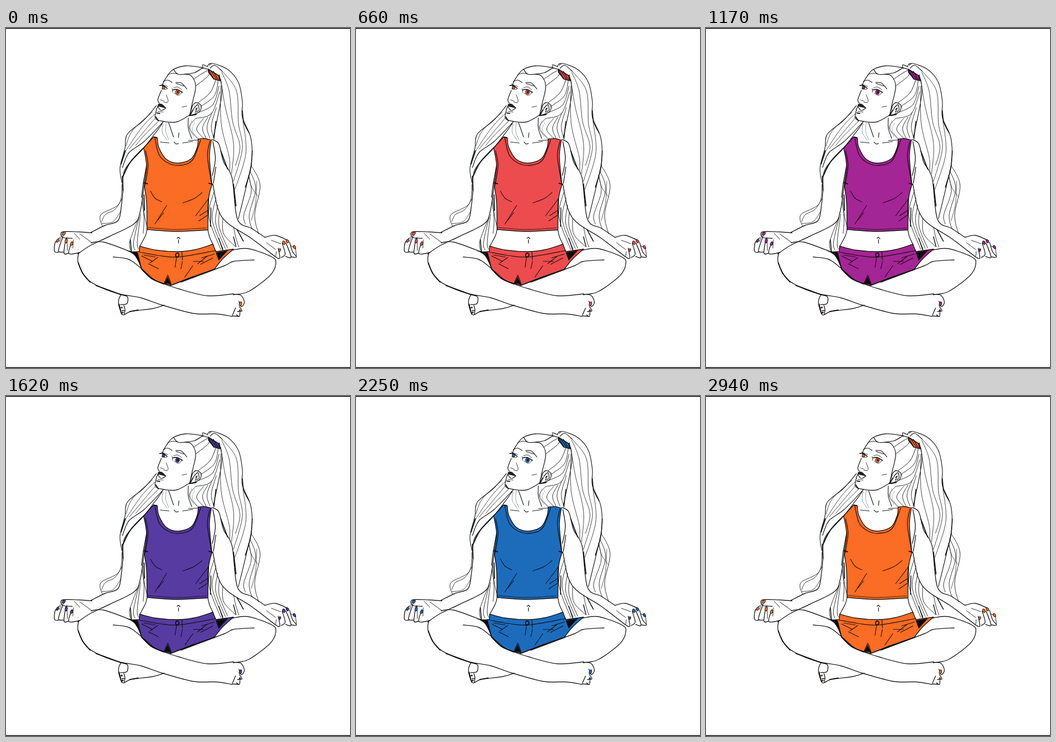
Animation of 700 by 692 pixels, one loop 3090 ms. Source, as an HTML page:

```html
<!DOCTYPE html>
<html lang="en">
<head>
<meta charset="utf-8">
<title>Sitting figure</title>
<style>
html, body { margin: 0; width: 100%; height: 100%; overflow: hidden; background: #fff; }
svg { display: block; width: 100vw; height: 100vh; animation: dye 3090ms infinite; }
path { stroke-linecap: round; stroke-linejoin: round; }
svg { --orange: rgb(251,108,36); --pink: rgb(214,25,144); --violet: rgb(105,50,155); --royal: rgb(30,88,180); --sky: rgb(28,131,197); }
/* Time in ms / 3090; each fade advances in 30 ms steps */
@keyframes dye {
  0% { color: var(--orange); animation-timing-function: step-end; }
  15.534% { color: var(--orange); animation-timing-function: steps(18, start); }
  33.01% { color: var(--pink); animation-timing-function: steps(13, start); }
  45.631% { color: var(--violet); animation-timing-function: step-end; }
  49.515% { color: var(--violet); animation-timing-function: steps(17, start); }
  66.019% { color: var(--royal); animation-timing-function: step-end; }
  66.99% { color: var(--royal); animation-timing-function: steps(15, start); }
  81.553% { color: var(--sky); animation-timing-function: step-end; }
  91.262% { color: var(--sky); animation-timing-function: steps(5, start); }
  96.117%, 100% { color: var(--orange); animation-timing-function: step-end; }
}
</style>
</head>
<body>
<svg id="stage" viewBox="0 0 700 692" preserveAspectRatio="none">
  <rect width="700" height="692" fill="#fff"/>
  <path d="M0 .7H700M0 691H700" stroke="#000" stroke-width="1.5"/>
</svg>
<script>
const stage = document.getElementById('stage');
const points = text => text.trim().split(/\s+/).map(s => s.split(',').map(Number));

// Smooth curve through a list of points
function curve(p, start = 'M') {
  const at = i => p[Math.max(0, Math.min(p.length - 1, i))];
  let d = start + p[0];
  for (let i = 0; i < p.length - 1; i++) {
    const [a, b, c, e] = [at(i - 1), at(i), at(i + 1), at(i + 2)];
    const c1 = b.map((v, k) => v + (c[k] - a[k]) / 6);
    const c2 = c.map((v, k) => v - (e[k] - b[k]) / 6);
    d += `C${c1} ${c2} ${c}`;
  }
  return d;
}

function add(d, width, fill = 'none', stroke = '#0b0b0b', transform = '') {
  const el = document.createElementNS('http://www.w3.org/2000/svg', 'path');
  const attrs = { d, fill, stroke, transform, 'stroke-width': width };
  for (const k in attrs) el.setAttribute(k, attrs[k]);
  stage.append(el);
}

// ";" separates strokes, "|" marks a corner of a shape
const ink = (width, text, stroke) =>
  add(text.split(';').map(s => curve(points(s))).join(''), width, 'none', stroke);
const shape = (text, fill = 'currentColor', width = 1.4) =>
  add(text.split('|').map((s, i) => curve(points(s), i ? 'L' : 'M')).join('') + 'Z', width, fill);
const dot = (x, y, rx, ry, turn = 0, width = 1, fill = 'currentColor') =>
  add(`M${-rx} 0A${rx} ${ry} 0 0 1 ${rx} 0A${rx} ${ry} 0 0 1 ${-rx} 0Z`, width, fill, '#0b0b0b',
    `translate(${x} ${y}) rotate(${turn})`);

// n hairs blended between two guide curves
function hairs(n, from, to, width = .9, stroke = '#1c1c1c') {
  const a = points(from), b = points(to);
  for (let i = 0; i < n; i++) {
    const t = n > 1 ? i / (n - 1) : 0;
    add(curve(a.map((p, j) => p.map((v, k) => v + (b[j][k] - v) * t))), width, 'none', stroke);
  }
}

// Top
shape(`300,222 308,224 | 308,224 311,243 326,267 350,275 377,266 389,243 391,226 | 391,226 404,225 418,228 |
  418,228 414,262 419,319 | 419,319 412,350 411,411 | 411,411 345,414 287,410 | 287,410 286,355 281,318 |
  281,318 286,280 280,244 | 280,244 300,222`);
ink(1.3, '303,225 312,259 332,276 357,279 380,268 396,228; 284,250 289,280 283,320; 415,230 410,262 419,319');
ink(.9, '289,406 345,410 408,407');
ink(1.1, `294,332 303,346 317,354; 399,335 383,347 360,356; 327,361 303,399; 321,376 309,391;
  411,349 386,382; 411,371 394,382; 410,381 392,393`);
ink(2, '281,315 288,317; 412,347 411,378; 413,316 420,318; 301,222 307,223');

// Shorts
shape(`272,444 305,452 350,455 385,451 421,440 | 421,440 427,455 | 427,455 463,450 | 463,450 440,471 424,491 |
  424,491 375,508 335,524 | 335,524 300,512 276,491 | 276,491 266,466 254,456 | 254,456 271,455 | 271,455 272,444`);
ink(1.2, `271,456 310,463 352,466 427,453; 358,456 359,472; 347,467 344,487; 359,475 356,490;
  276,464 298,475; 280,462 304,466; 309,467 293,478; 290,480 310,490`);
ink(1.2, `424,460 398,468; 421,468 396,481; 410,464 390,480; 381,475 402,475; 380,484 364,507;
  329,503 322,519; 330,504 336,521`);
shape('329,507 322,521 | 322,521 329,520 336,523 | 336,523 329,507', '#0b0b0b', .6);
shape('246,453 268,457 | 268,457 276,489 | 276,489 262,463 246,453', '#0b0b0b', .5);
shape('427,457 451,453 | 451,453 433,473 | 433,473 427,457', '#0b0b0b', .4);
dot(348.5, 462, 3.4, 4, 10, 2);

// Waist
ink(1.3, '287,410 284,422 272,445; 411,412 414,425 422,442; 348,428 351,426 354,429; 351,431 351,438');

// Ponytail and bun
ink(1.2, `414,76 421,72 452,85 473,111 481,150 481,182 498,223 500,270 489,322 473,388;
  401,83 400,75 411,79; 410,78 413,73 418,73; 415,82 425,76 440,88; 434,95 439,135 422,223`);
hairs(2, '440,88 469,128 473,194 481,245 463,312', '439,90 454,128 461,190 476,240 467,280');
hairs(2, '437,104 446,160 463,235 459,296', '437,118 438,195 454,262 455,290');
hairs(1, '482,188 488,255 466,328', '482,188 488,255 466,328');
hairs(3, '499,280 517,320 506,380 514,419', '493,300 499,334 484,380 487,399', 1);
hairs(2, '514,344 500,324 495,302', '510,312 508,356 499,392', .8);
ink(1.6, '481,168 484,192 495,214; 501,250 498,286 487,324; 427,190 423,226');

// Hair on the head
ink(1.3, `329,96 341,84 366,77 396,80 410,84; 341,84 350,94 375,96 386,118 379,153 374,177;
  363,94 383,91 399,82`);
ink(1, `331,94 341,92 350,94; 382,104 400,92 411,86; 386,118 408,101 414,93; 391,152 415,132 427,106`);
hairs(3, '396,160 424,138 432,106', '387,184 418,174 435,130', 1);
hairs(2, '386,184 373,203 391,226', '402,184 388,206 404,226', 1);
hairs(3, '411,181 400,204 408,226', '428,162 418,198 422,222', 1);
hairs(2, '378,188 375,208 383,221', '384,193 379,208 389,223', .9, '#8aa5b2');
shape('412,84 433,97 | 433,97 434,107 | 434,107 423,104 | 423,104 412,90 | 412,90 412,84', 'currentColor', 1.7);
ink(1.3, '416,86 428,104; 422,88 431,104; 411,83 423,104; 433,97 436,108');

// Face
ink(1.3, `330,95 321,109 318,119; 316,127 309,146 312,153; 309,159 306,167 304,184 320,190 348,191 377,175`);
ink(1.2, '320,109 329,106 338,111; 345,111 357,112 368,124; 346,113 362,118');
ink(.9, '338,123 339,131; 326,136 330,148 327,152; 314,146 322,149; 321,151 328,152; 358,161 368,159; 320,171 309,170');
ink(1.8, '313,117 320,117 328,123; 340,126 348,125 359,131; 307,173 313,174; 305,181 310,189');
ink(.9, '317,124 327,125; 342,132 350,137 358,132; 341,122 349,120 358,126; 316,114 329,119');
dot(320.5, 121.5, 2.6, 3, 20);
dot(349, 130.5, 4, 4.3, 10);
dot(349.5, 130.5, 1.4, 1.7, 0, .8, '#0b0b0b');
shape('310,155 317,155 326,163 | 326,163 309,159 | 309,159 310,155', '#2a1d1f', .8);
ink(1.2, '309,160 316,168 325,163');

// Ear and neck
ink(1.3, `378,160 386,152 397,158 393,171 376,178; 382,164 390,156 393,166 388,171;
  385,166 389,163 385,172; 379,160 373,179`);
ink(2, '376,178 387,176; 381,166 374,178');
ink(1.2, `371,183 371,204 378,225; 331,193 341,222; 352,213 351,223; 342,232 346,236 351,235;
  314,232 332,234; 359,234 380,231; 371,229 391,228`);
hairs(2, '320,195 318,212 328,228', '326,193 325,210 331,227', .9, '#6f8b98');

// Hair falling on the left
ink(1.2, `306,158 280,188 247,216 242,245 232,285 236,315; 320,191 281,231 250,254 237,284;
  318,195 282,242 242,288 238,332`);
hairs(2, '304,174 276,203 241,254', '304,183 277,215 251,246');
hairs(2, '298,171 258,208 244,240', '310,190 281,219 264,239');
ink(2.3, '280,244 253,273 238,302; 243,250 234,277; 237,302 238,330', '#10181c');
hairs(2, '236,318 230,358 193,380 196,403', '237,346 222,369 202,380 195,394', 1);
hairs(1, '234,372 218,394 195,398', '234,372 218,394 195,398');

// Left arm and the strands behind it
ink(1.4, `238,330 235,360 228,392 201,402 173,416; 281,320 273,374 260,399 211,424 171,443 146,460;
  286,280 279,318 276,345`);
hairs(2, '279,346 281,377 288,409', '277,353 281,388 279,418', 1);
hairs(3, '268,391 252,434 253,452', '274,379 267,438 272,452', 1);
ink(1.8, '281,340 282,371; 253,431 255,454');

// Left hand
ink(1.4, `175,417 148,415 115,415 115,426 135,428; 109,427 100,437 99,455 108,456;
  116,424 107,453 118,456; 122,428 118,458 128,458; 134,435 128,459 150,457`);
ink(1, '113,422 109,435; 124,426 125,453; 150,419 175,437; 137,431 136,448; 139,418 150,430');
dot(117.5, 418.5, 2.6, 4, 40);
dot(105, 433, 2.2, 3.6, 30);
dot(122.5, 433.5, 2.4, 4.2, 12);
dot(133.5, 439, 2.4, 3.8, 25);

// Right arm and the strands behind it
ink(1.4, `419,227 433,236 443,273 460,305 471,389 500,408 527,426;
  421,318 432,370 452,398 499,428 546,464; 421,231 426,266 420,300; 427,283 422,316`);
ink(1.9, '463,318 468,362; 437,250 451,287');
hairs(4, '424,331 413,384 437,451', '434,376 434,406 451,448', 1);
hairs(2, '441,387 443,419 466,444', '463,405 468,428 474,446', 1);
ink(1.6, '470,410 483,434; 417,366 416,404; 433,428 441,452; 463,425 468,445');

// Right hand
ink(1.4, `527,426 548,422 575,433; 546,464 557,469 554,448; 577,436 583,455 591,466 581,466;
  570,438 580,466 569,465; 562,438 568,460 560,467`);
ink(1, '589,448 591,464; 540,432 559,439; 530,437 549,451; 550,455 549,464; 579,443 590,449');
dot(565.5, 437, 2.6, 3.8, -20);
dot(572.5, 434, 2.4, 3.6, -25);
dot(587, 446, 2.2, 3.6, -25);
dot(557, 452, 2, 3, 20);

// Legs
ink(1.4, `148,457 147,478 165,511 198,530 234,542 274,549 318,564 382,581 428,582 460,587;
  173,437 200,436 258,457; 218,466 250,471 276,490 305,514 352,531 410,545 463,541`);
ink(1.4, `461,452 493,449 541,466 549,480 537,504 494,536 463,543; 335,524 378,508 444,484 463,475 505,472`);
ink(2.1, '147,478 156,499 171,517; 183,524 232,542; 276,491 296,510 321,521; 425,491 356,517');

// Feet
ink(1.4, `462,542 478,544 485,558 479,567 474,556; 475,567 480,576 471,577; 476,579 475,587 469,584;
  475,587 460,586; 467,570 461,584`);
ink(1.4, `234,542 229,555 231,570 238,584 254,577 299,571 322,564; 234,543 247,547 246,561 233,563;
  240,565 242,574 236,575; 242,575 241,583`);
ink(1.9, '230,562 235,582; 252,577 269,574');
dot(477, 561.5, 2.4, 4.4, 15);
dot(476, 575, 1.5, 2);
dot(235.5, 569, 1.6, 1.4);
dot(237.5, 579, 1.5, 1.8);
</script>
</body>
</html>
```
